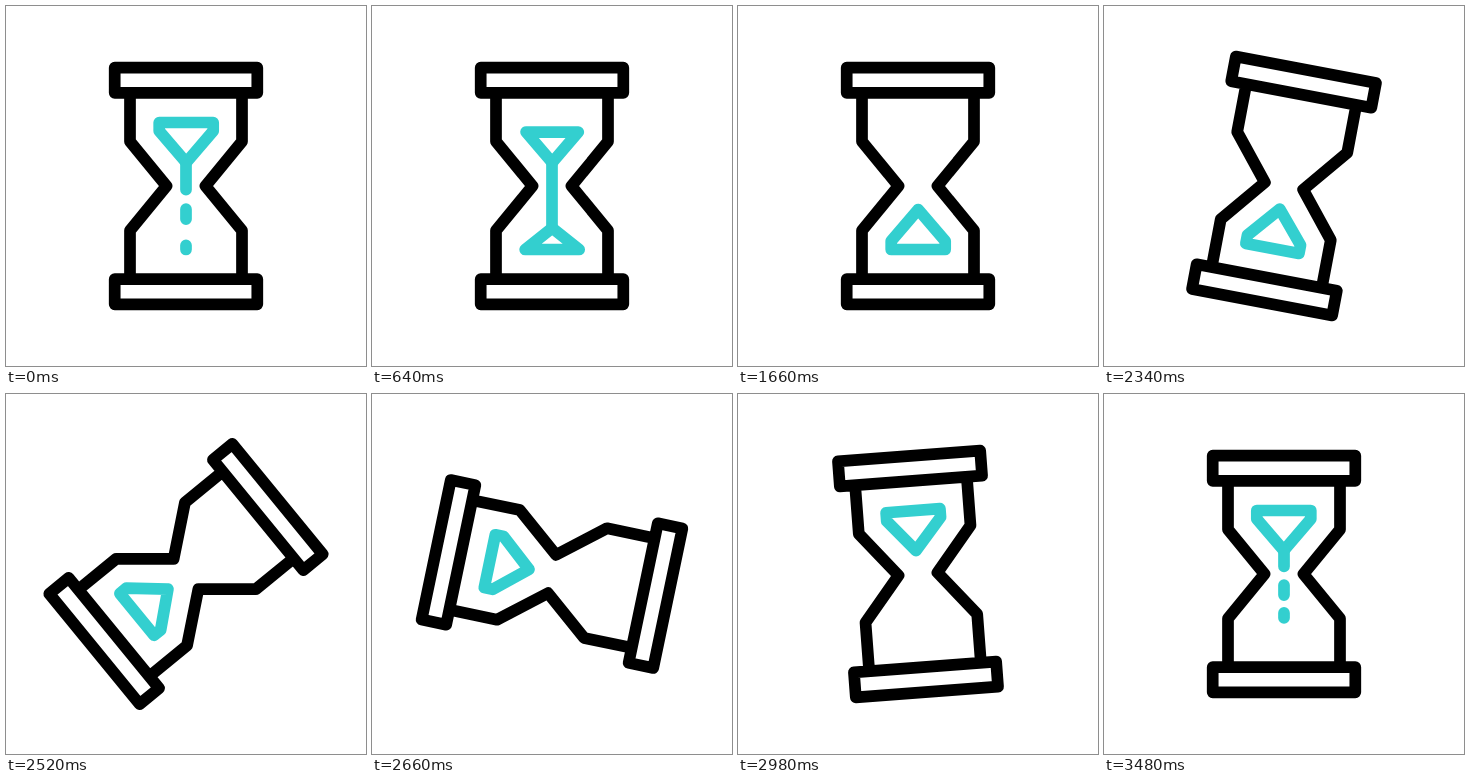
These frames come from a looping animation (360 by 360 pixels, 3.5 s). An HTML page:

```html
<!DOCTYPE html>
<html lang="en">
<head>
<meta charset="utf-8">
<title>Hourglass</title>
<style>
  html, body { margin: 0; width: 100%; height: 100%; overflow: hidden; background: #fff; }
  svg { display: block; width: 100vw; height: 100vh; }
  path { fill: none; stroke-width: 11.7; stroke-linecap: round; stroke-linejoin: round; }
  .glass { stroke: #000; }
  .sand { stroke: #33cfcf; }
</style>
</head>
<body>
<svg viewBox="0 0 360 360">
  <g id="body">
    <path class="glass" d="M108.7 61.7H251.3V86.8H108.7Z M108.7 273.2H251.3V298.3H108.7Z
      M124 87V135.5L160.5 180L124 224.5V273 M236 87V135.5L199.5 180L236 224.5V273"/>
    <path class="sand" id="pile"/>
  </g>
  <path class="sand" id="top"/>
  <path class="sand" id="stream"/>
</svg>
<script>
  const LOOP = 3500, POUR = 3264, TURN = 2160, TURN_MS = 940, EMPTY = 1480, FULL = 1660;
  const APEX = 156.5, BASE = 243.5, SHOULDER = 125;
  const [body, pile, top_, stream] =
    ['body', 'pile', 'top', 'stream'].map(id => document.getElementById(id));

  const clamp = x => Math.min(1, Math.max(0, x));
  // Linear ramp from a to b while t runs from t0 to t1
  const ramp = (t, t0, t1, a, b) => a + (b - a) * clamp((t - t0) / (t1 - t0));

  // cubic-bezier(.5, 0, .5, 1)
  function ease(x) {
    let lo = 0, hi = 1;
    for (let i = 0; i < 24; i++) {
      const s = (lo + hi) / 2;
      if (1.5 * s * (1 - s) + s ** 3 < x) lo = s; else hi = s;
    }
    return lo * lo * (3 - 2 * lo);
  }

  // Five-cornered heap: flat side, shoulders, tip
  const heap = (flat, shoulder, tip, w) =>
    `M${180.2 - w} ${flat}H${180.2 + w}V${shoulder}L180.2 ${tip}L${180.2 - w} ${shoulder}Z`;

  const pileTip = t => t < 640 ? ramp(t, 15, 640, BASE, 222) : ramp(t, 640, FULL, 222, 203.5);

  function drawPile(t) {
    if (t < 15) return '';
    const shoulder = ramp(t, 700, FULL, BASE, 360 - SHOULDER);
    return heap(BASE, shoulder, pileTip(t), ramp(t, 15, 220, 0, 27));
  }

  function drawTop(t) {
    if (t >= EMPTY) return '';
    const level = t < 640 ? ramp(t, 0, 640, 116.5, 126) : ramp(t, 640, EMPTY, 126, APEX);
    const w = 27 * Math.min(1, (APEX - level) / (APEX - SHOULDER));
    return heap(level, Math.max(level, SHOULDER), APEX, w);
  }

  function drawStream(t) {
    const s = (t - POUR + LOOP) % LOOP;
    const floor = t < POUR ? pileTip(t) : BASE;
    const fall = (start, k) => 156 + k * Math.max(0, s - start) ** 3;
    const seg = (a, b) => a < floor ? `M180 ${a}V${Math.min(b, floor) + 0.01}` : '';
    const drop = (y, half) => seg(y - half, y + half);
    const tail = 156 + 60 * clamp((s - EMPTY + POUR - LOOP) / 140) ** 2;
    const line = seg(tail, fall(111, 1.382e-5));
    return s < 400 ? line + drop(fall(0, 3.92e-6), 5) + drop(fall(5, 6.87e-6), 2.5) : line;
  }

  function draw(t) {
    const pouring = t < FULL || t >= POUR;
    const angle = 180 * ease(clamp((t - TURN) / TURN_MS));
    body.setAttribute('transform', `rotate(${angle} 180 180)`);
    pile.setAttribute('d', drawPile(t));
    top_.setAttribute('d', drawTop(t));
    stream.setAttribute('d', pouring ? drawStream(t) : '');
  }

  const begin = performance.now();
  function tick() {
    draw((performance.now() - begin) % LOOP);
    requestAnimationFrame(tick);
  }
  tick();
</script>
</body>
</html>
```
